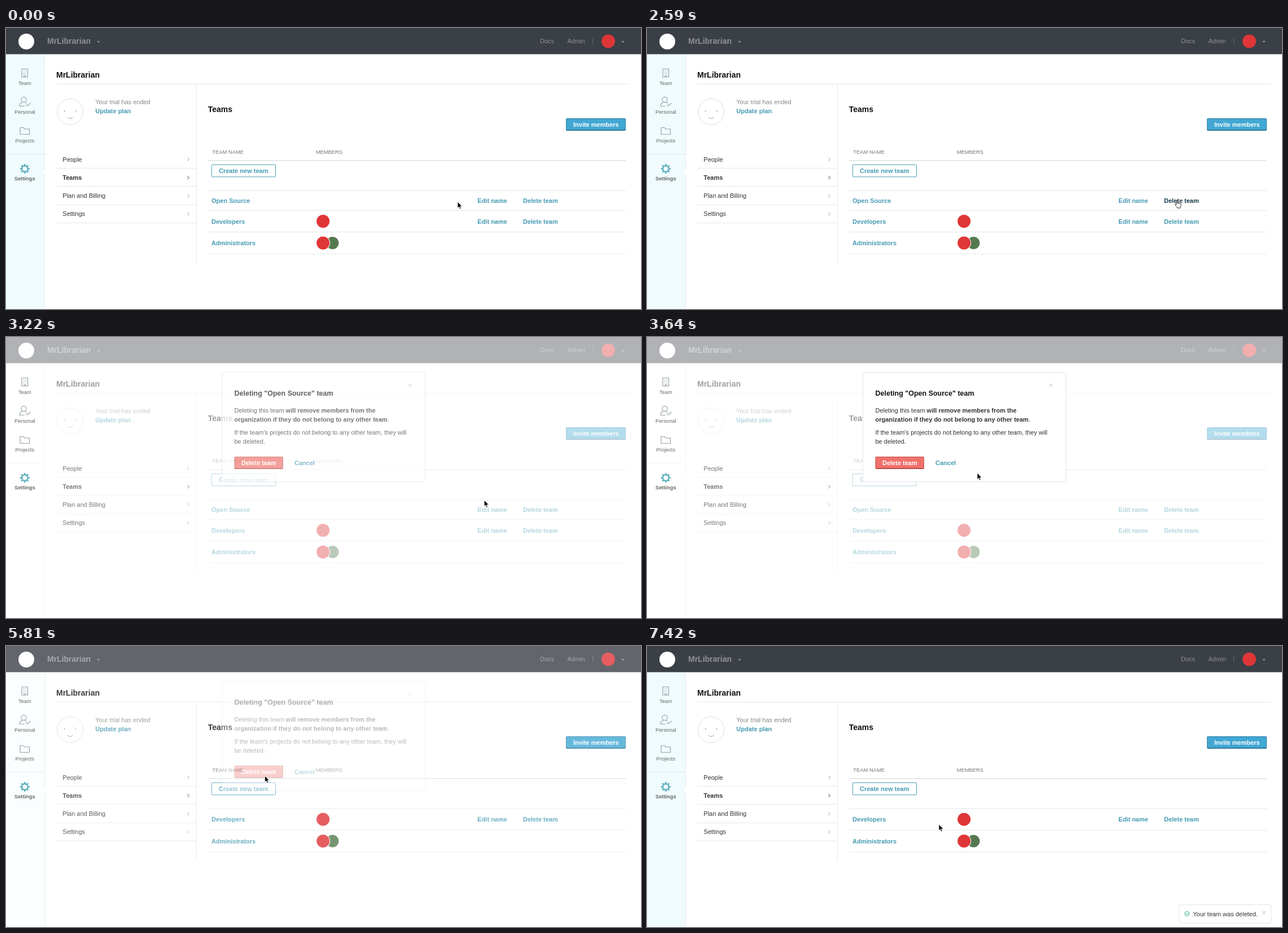
These frames come from a looping animation (1125x498 px, 7490 ms). An HTML page:

```html
<!DOCTYPE html>
<html lang="en">
<head>
<meta charset="utf-8">
<title>Deleting a team</title>
<style>
html, body { margin: 0; width: 100%; height: 100%; overflow: hidden; background: #fff; }
svg { display: block; font: 11px "Liberation Sans", Arial, sans-serif; fill: none; }
text { fill: #333; white-space: pre; }
.b { font-weight: bold; }
.link { fill: #459ab3; font-weight: bold; }
.hover { fill: #17384a; }
.white { fill: #fff; font-weight: bold; }
.grey { fill: #888; }
.side { font-size: 9.3px; fill: #666; text-anchor: middle; }
.title { font-size: 14px; font-weight: bold; fill: #111; }
.small { font-size: 12.5px; }
.cols { font-size: 9.4px; fill: #777; }
.head { fill: #8f9296; }
.line { stroke: #e4e7e8; }
.icon { stroke: #98a2a6; stroke-width: 1.2; }
.gear { stroke: #5fb0bd; stroke-width: 2.4; }
.tick { stroke: #4fb98a; stroke-width: 1.2; }
.card { fill: #fff; stroke: #e1e5e7; }
</style>
</head>
<body>
<svg id="stage" width="1125" height="498" viewBox="0 0 1125 498"></svg>
<script>
const LOOP = 7490, STEP = 70;
const $ = id => document.getElementById(id);
const text = (x, y, s, cls = '', id = '') => `<text x="${x}" y="${y}" class="${cls}" id="${id}">${s}</text>`;
const path = (d, cls = 'line', more = '') => `<path d="${d}" class="${cls}" ${more}/>`;
const rect = (x, y, w, h, more) => `<rect x="${x}" y="${y}" width="${w}" height="${h}" ${more}/>`;
const circle = (x, y, r, more) => `<circle cx="${x}" cy="${y}" r="${r}" ${more}/>`;
const avatar = (x, y, r = 11.5) => circle(x, y, r, 'fill="#df3638"');
const chevron = (x, y) => path(`M${x - 2} ${y - 1}l2 2 2-2`, '', 'stroke="#9b9ea2" stroke-width="1.3"');
const cross = (x, y) => path(`M${x - 2.5} ${y - 2.5}l5 5m0-5l-5 5`, '', 'stroke="#cfdce0" stroke-width="1.6"');
const button = (x, y, w, fill, edge, id = '') =>
  rect(x, y, w, 22, `rx="2" fill="${edge}"`) +
  rect(x + .5, y + .5, w - 1, 20, `rx="2" fill="${fill}" stroke="${edge}" stroke-opacity=".3" id="${id}"`);

const header = rect(0, 0, 1125, 46.4, 'fill="#3b3f46"') +
  circle(36, 24, 14, 'fill="#fff"') +
  `<g class="late">${text(73, 27.5, 'MrLibrarian', 'title head')}${chevron(164, 24)}</g>` +
  text(946, 27, 'Docs', 'head') + text(994.5, 27, 'Admin', 'head') +
  path('M1039.5 18v10', '', 'stroke="#63676d"') + avatar(1067, 23.5, 12) + chevron(1093, 24);

const sidebar = rect(0, 46, 69, 452, 'fill="#f0fbfe" id="tint"') +
  path('M68.5 46V498M0 223.5H69', '', 'stroke="#e0e9ec"') +
  path('M69.5 251l-5 5 5 5z', '', 'fill="#fff"');

const places =
  path('M28 72.5h10.5V87H28zM31 75.5h1.5m2 0h1.5m-5 3h1.5m2 0h1.5m-5 3h1.5m2 0h1.5M32 87v-2.5h2.5V87', 'icon') +
  circle(31.5, 127, 4.6, 'class="icon"') +
  path('M24 138.5c0-4.5 2.5-6 5-6.5M33.5 132c1.5.3 2.5.8 3.3 1.5M24 138.5H33M35.5 135.5l2.5 2.5 5.5-5', 'icon') +
  '<g class="late">' + path('M25 188.5V176.5h6l1.7 2.5H41.5v9.5z', 'icon') +
  circle(33.3, 249.5, 5.3, 'class="gear"') +
  circle(33.3, 249.5, 7.3, 'class="gear" pathLength="16" stroke-dasharray="1" stroke-dashoffset=".5"') + '</g>' +
  text(33.3, 100.5, 'Team', 'side') + text(33.3, 151.5, 'Personal', 'side') +
  text(33.3, 202.5, 'Projects', 'side') + text(33.3, 270, 'Settings', 'side b');

const menu = ['People', 'Teams', 'Plan and Billing', 'Settings'].map((name, i) => {
  const y = 236.5 + 32.2 * i, on = name === 'Teams';
  return text(100.3, y, name, on ? 'b' : '') +
    path(`M321.5 ${y - 6.5}l3 3-3 3`, '', `stroke="${on ? '#333' : '#999'}"`);
}).join('');

const account = text(89, 88, 'MrLibrarian', 'title') + path('M89 99.5H1106') +
  circle(113.7, 148.5, 23, 'stroke="#dadfe1"') +
  circle(103.7, 147.2, .9, 'fill="#888"') + circle(123.5, 147.2, .9, 'fill="#888"') +
  path('M109 158q4.7 5 9.4 0', '', 'stroke="#999"') +
  text(158.3, 135, 'Your trial has ended', 'grey') + text(158.3, 151, 'Update plan', 'link') +
  path('M89 248.5H337M89 280.5H337M89 313.5H337M89 345.5H337');

const edits = y => text(835.3, y, 'Edit name', 'link', 'edit' + y) + text(916, y, 'Delete team', 'link', 'del' + y);
const teams = path('M337.5 100V416', 'line', 'id="divider"') +
  text(357.7, 149, 'Teams', 'title') +
  button(992, 160, 106, '#41a7d3', '#2b6f8e') + text(1005, 174.5, 'Invite members', 'white') +
  text(365.3, 223, 'TEAM NAME', 'cols') + text(548.7, 223, 'MEMBERS', 'cols') +
  path('M358 235H1098', '', 'stroke="#dde1e2" stroke-width="1.5"') +
  rect(364.3, 242.3, 113.2, 21.5, 'rx="1.5" stroke="#459ab3"') + text(377, 257, 'Create new team', 'link') +
  path('M358 288.5H1098') +
  `<g id="first">${text(364, 310, 'Open Source', 'link')}${edits(310)}${path('M358 323.5H1098')}</g>` +
  `<g id="rest">${text(364, 346.5, 'Developers', 'link')}${avatar(561.7, 342.5)}${edits(346.5)}` +
  path('M358 361.5H1098') + text(364, 385, 'Administrators', 'link') +
  circle(578.5, 381, 11, 'fill="#55794f"') + circle(561.7, 381, 12.5, 'fill="#fff"') + avatar(561.7, 381) +
  path('M358 400.3H1098') + '</g>';

const bold = s => `<tspan class="b">${s}</tspan>`;
const modal = rect(382.5, 62.5, 360, 194, 'rx="4" class="card"') + cross(715.5, 85.5) +
  text(404.5, 104, 'Deleting "Open Source" team', 'title small') +
  text(404.5, 133.5, 'Deleting this team ' + bold('will remove members from the')) +
  text(404.5, 149.5, bold('organization if they do not belong to any other team') + '.') +
  text(404.5, 173, "If the team's projects do not belong to any other team, they will") +
  text(404.5, 188.5, 'be deleted.') +
  button(404.5, 212, 86.5, '#f0716b', '#b04540', 'red') + text(417, 226.5, 'Delete team', 'white') +
  text(511, 227, 'Cancel', 'link');

const toast = rect(943, 458.5, 163, 32.5, 'rx="4" class="card"') +
  circle(956.7, 474.5, 4, 'class="tick"') + path('M954.8 474.5l1.5 1.5 2.5-2.8', 'tick') +
  text(967.3, 478.5, 'Your team was deleted.') + cross(1093, 472.5);

const cursor = path('M0 0V11.2l2.6-2.3 1.7 4 1.9-.8-1.7-3.9H8z', '',
    'id="arrow" fill="#000" stroke="#fff" stroke-width=".8"') +
  path('M-1 1.2C-1-.4 1.2-.4 1.2 1.2V5c.5-.9 1.9-.8 2.1.2.5-.8 1.8-.6 2 .4.6-.6 1.7-.2 1.7.8 0 2.5-.2 3.2-1 4.8V13H.3v-1.2C-1.2 10.5-2 9-3.4 7.3c-.7-1 .6-1.9 1.4-1.1l1 .9z', '',
    'id="hand" fill="#fff" stroke="#111" stroke-width=".9"');

$('stage').innerHTML = sidebar + header + account + teams +
  rect(0, 0, 1125, 498, 'fill="#fff" id="veil"') + places + `<g id="menu">${menu}</g>` +
  `<g id="modal">${modal}</g><g id="toast">${toast}</g><g id="cursor">${cursor}</g>`;
const late = document.querySelectorAll('.late');

// Pointer stops: time, x, y
const stops = [
  [0, 800, 308], [1750, 800, 308], [2450, 939, 306], [3010, 939, 306], [3640, 585, 241],
  [4130, 451, 224], [5670, 451, 224], [6160, 489, 255], [6440, 489, 255], [7000, 517, 316], [LOOP, 517, 316]
];
const ramp = (t, a, b) => Math.min(1, Math.max(0, (t - a) / (b - a)));

function pointer(t) {
  const i = stops.findIndex(s => s[0] > t);
  const [t0, x0, y0] = stops[i - 1], [t1, x1, y1] = stops[i];
  const u = ramp(t, t0, t1), e = u * u * (3 - 2 * u);
  return [x0 + (x1 - x0) * e, y0 + (y1 - y0) * e];
}

function draw(t) {
  const [x, y] = pointer(t);
  const over = (l, top, r, bottom) => x >= l && x <= r && y >= top && y <= bottom;
  const deleted = t >= 5670, open = t >= 2940 && !deleted;
  const onEdit = t < 2940 && over(835, 299, 888, 313);
  const onDelete = t < 3080 && over(916, 299, 978, 313);
  const onRed = open && over(404, 212, 491, 234);
  const hand = onEdit || onDelete && !open || onRed;
  const closing = 1 - ramp(t, 5670, 5880);
  const veil = .6 * ramp(t, 2850, 3130) * closing;

  $('cursor').setAttribute('transform', `translate(${x} ${y})`);
  $('hand').style.opacity = +hand;
  $('arrow').style.opacity = +!hand;
  $('edit310').classList.toggle('hover', onEdit);
  $('del310').classList.toggle('hover', onDelete);
  $('red').style.fill = onRed ? '#e84c40' : '#f0716b';
  $('veil').style.opacity = veil;
  $('tint').style.opacity = 1 - ramp(veil, 0, .3);
  $('menu').style.opacity = 1 - Math.min(veil, .34);
  $('modal').style.opacity = ramp(t, 3080, 3290) * closing;
  $('toast').style.opacity = ramp(t, 5880, 6090);
  $('first').style.opacity = +!deleted;
  $('rest').setAttribute('transform', `translate(0 ${deleted ? -35.3 : 0})`);
  $('divider').setAttribute('d', `M337.5 100V${deleted ? 381 : 416}`);
  late.forEach(g => g.style.opacity = +(t < 5880 || t >= 6440));
}

const start = performance.now();
function frame() {
  const t = (performance.now() - start) % LOOP;
  draw(Math.floor(t / STEP) * STEP);
  requestAnimationFrame(frame);
}
frame();
</script>
</body>
</html>
```
